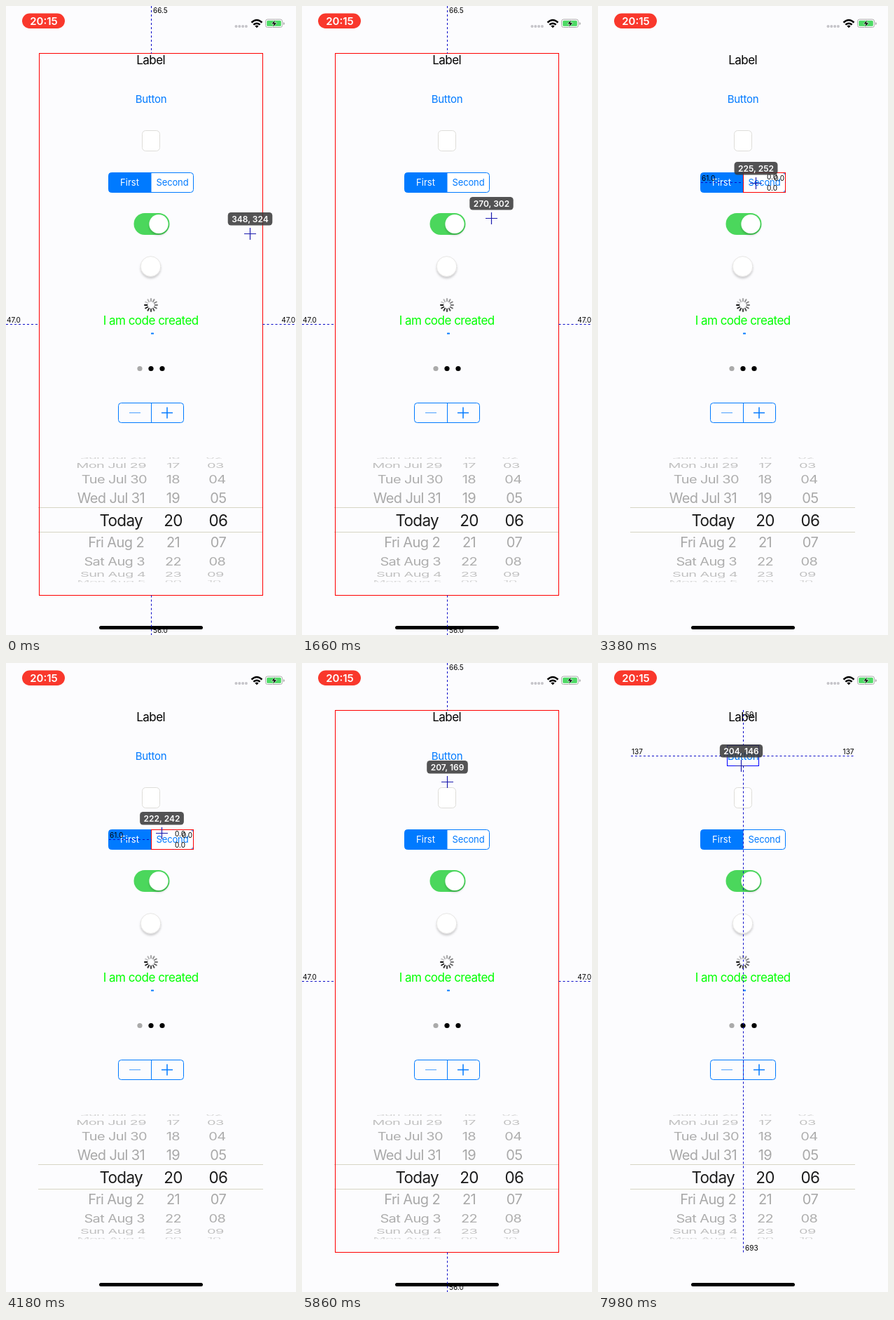
These frames come from a looping animation (414x896 px, 8000 ms). An HTML page:

```html
<!DOCTYPE html>
<html lang="en">
<head>
<meta charset="utf-8">
<title>Layout inspector</title>
<style>
html, body { margin: 0; width: 100%; height: 100%; overflow: hidden; background: #fcfcfe; }
svg { display: block; width: 414px; height: 896px; font-family: Inter, "Open Sans", sans-serif; }
text { letter-spacing: -.03em; }
.mid { text-anchor: middle; }
.end { text-anchor: end; }
.size { font-size: 10px; letter-spacing: 0; }
.blue { fill: #007aff; }
.line { fill: none; stroke: #007aff; }
.guide { stroke: #0a0ac8; stroke-dasharray: 3 3; fill: none; }
</style>
</head>
<body>
<svg viewBox="0 0 414 896">
  <defs>
    <filter id="shadow" x="-40%" y="-40%" width="180%" height="190%">
      <feDropShadow dx="0" dy="2.5" stdDeviation="1.6" flood-opacity=".2"/>
    </filter>
    <clipPath id="wheel"><rect x="46" y="643" width="321" height="177.5"/></clipPath>
  </defs>

  <g id="status">
    <rect x="23" y="10.5" width="61" height="21.5" rx="10.75" fill="#f9382c"/>
    <text x="54" y="26.5" class="mid" font-size="15" font-weight="600" fill="#fff" style="letter-spacing:0">20:15</text>
    <g fill="#c5c4c9">
      <circle cx="328.5" cy="29" r="2"/><circle cx="333.3" cy="29" r="2"/>
      <circle cx="338.1" cy="29" r="2"/><circle cx="342.9" cy="29" r="2"/>
    </g>
    <g fill="none" stroke="#000" stroke-width="2.4">
      <path d="M350.5 23.5Q358 16.5 365.5 23.5"/>
      <path d="M353.3 26.7Q358 22.6 362.7 26.7"/>
    </g>
    <path d="M355.4 28.6Q358 26.6 360.6 28.6L358 31.2Z"/>
    <rect x="370.5" y="19" width="24" height="11.5" rx="3" fill="#fff" stroke="#aaa"/>
    <rect x="372.2" y="20.7" width="20.6" height="8.1" rx="1.6" fill="#4cd964"/>
    <path d="M396 23v4q1.6-.5 1.6-2t-1.6-2Z" fill="#999"/>
    <path d="M384.5 19.5L378.8 25.7H382.2L380.7 30.5L386.8 24H383.3Z" stroke="#fff" stroke-width=".6"/>
  </g>

  <text x="206.7" y="82.5" class="mid" font-size="17">Label</text>
  <text x="207" y="137.5" class="mid blue" font-size="15" style="letter-spacing:-.02em">Button</text>
  <rect x="194.5" y="177.5" width="25" height="29" rx="5" fill="#fff" stroke="#deddd9"/>

  <g font-size="13">
    <rect x="146.5" y="237.5" width="121" height="28" rx="4" fill="#fff"/>
    <path d="M207.5 237.5H150.5a4 4 0 0 0-4 4v20a4 4 0 0 0 4 4h57Z" class="blue"/>
    <rect x="146.5" y="237.5" width="121" height="28" rx="4" class="line"/>
    <text x="176.5" y="256" class="mid" fill="#fff" style="letter-spacing:0">First</text>
    <text x="237.5" y="256" class="mid blue" style="letter-spacing:-.01em">Second</text>
  </g>

  <rect x="182.5" y="295" width="51" height="31" rx="15.5" fill="#4bd75c"/>
  <circle cx="218" cy="310.5" r="13.6" fill="#fff" filter="url(#shadow)"/>
  <circle cx="206.5" cy="371" r="14.3" fill="#fff" stroke="#dddcd8" stroke-width=".7" filter="url(#shadow)"/>

  <g id="spinner" stroke="#111" stroke-width="2" stroke-linecap="round"></g>
  <text x="206.7" y="454" class="mid" font-size="17" fill="#0f0">I am code created</text>
  <rect x="207" y="465.5" width="4" height="2" rx=".6" class="blue"/>

  <circle cx="191" cy="516.5" r="3.6" fill="#aaa"/>
  <circle cx="207" cy="516.5" r="3.6"/>
  <circle cx="223" cy="516.5" r="3.6"/>

  <rect x="160.5" y="565.5" width="93" height="28" rx="4" class="line"/>
  <path d="M207.5 565.5V593.5" class="line"/>
  <path d="M176 579.5H192" class="line" opacity=".7"/>
  <path d="M222 579.5H238M230 571.5V587.5" class="line" stroke-width="1.5"/>

  <g id="picker" clip-path="url(#wheel)"></g>
  <path d="M46 714.5H367M46 749.5H367" stroke="#d6d5c4"/>
  <rect x="133" y="883" width="148" height="5" rx="2.5"/>

  <g id="overlay"></g>
  <g id="cursor">
    <rect id="badge" y="-30" height="18.5" rx="4.5" fill="#383838" fill-opacity=".86"/>
    <text id="coords" x=".5" y="-16.3" class="mid" font-size="12" font-weight="600" fill="#fff" style="letter-spacing:0"></text>
    <path d="M-8 .5H9M.5 -8V9" stroke="#1c1cae" stroke-width="1.2"/>
  </g>
</svg>

<script>
const $ = id => document.getElementById(id);
const LOOP = 8000;

$('spinner').innerHTML = Array.from({length: 12}, (_, i) =>
  `<path d="M207 420.5V417" opacity="${1 - .07 * i}" transform="rotate(${270 - 30 * i} 207 426)"/>`).join('');

// Wheel rows: centre y, vertical squash, grey, date, date right edge, hour, minute, minute centre
const rows = [
  [643.5, .22, '#d2d2d2', 'Sun Jul 28', 200, '16', '02', 297],
  [654.5, .48, '#c0c0c0', 'Mon Jul 29', 200, '17', '03', 299],
  [674, .77, '#adadad', 'Tue Jul 30', 201, '18', '04', 301.5],
  [701, .97, '#a8a8a8', 'Wed Jul 31', 198, '19', '05', 303],
  [733, 1, '#1c1c1c', 'Today', 195, '20', '06', 303],
  [764, .97, '#a8a8a8', 'Fri Aug 2', 197, '21', '07', 303],
  [791, .77, '#adadad', 'Sat Aug 3', 198, '22', '08', 301.5],
  [810, .48, '#c0c0c0', 'Sun Aug 4', 199, '23', '09', 299],
  [820.5, .22, '#d2d2d2', 'Mon Aug 5', 199, '00', '10', 297]
];
$('picker').innerHTML = rows.map(([y, squash, grey, date, right, hour, minute, mx]) => {
  const size = date === 'Today' ? 22.5 : 20;
  return `<g transform="translate(0 ${y}) scale(1 ${squash})" fill="${grey}" font-size="${size}">
    <g transform="translate(0 ${size * .364})"><text x="${right}" class="end">${date}</text>
    <text x="238.5" class="mid">${hour}</text><text x="${mx}" class="mid">${minute}</text></g></g>`;
}).join('');

// Inspectable views, innermost first. Boxes are [left, top, right, bottom]; sizes are left, top, right, bottom.
const screen = [0, 0, 414, 896], stack = [47, 67, 366.5, 839.5];
const button = [184.5, 117.5, 229.5, 146.5], field = [194.5, 177.5, 219.5, 206.5];
const views = [
  {box: [184.5, 124.5, 229.5, 140.5], parent: button, sizes: ['0', '6', '0', '6'], color: '#00f'},
  {box: button, parent: stack, sizes: ['137', '50', '137', '693'], color: '#00f'},
  {box: [201.5, 180.5, 212.5, 204.5], parent: field, sizes: ['7.0', '2.0', '7.0', '2.0'], color: '#f00'},
  {box: field, parent: stack, sizes: ['147', '110', '147', '633'], color: '#f00'},
  {box: [207.5, 237.5, 267.5, 265.5], parent: [147, 237, 267, 266], sizes: ['61.0', '0.0', '0.0', '0.0'], color: '#f00'},
  {box: [47.5, 67.5, 366.5, 839.5], parent: screen, sizes: ['47.0', '66.5', '47.0', '56.0'], color: '#f00'}
];

function overlayMarkup({box: [l, t, r, b], parent: [pl, pt, pr, pb], sizes, color}) {
  const cx = Math.round((l + r) / 2) + .5, cy = Math.floor((t + b) / 2) + .5;
  const label = (x, y, value, side = '') => `<text x="${x}" y="${y}" class="size ${side}">${value}</text>`;
  return `<rect x="${l}" y="${t}" width="${r - l}" height="${b - t}" fill="none" stroke="${color}"/>
    <path class="guide" d="M${pl} ${cy}H${l}M${r} ${cy}H${pr}M${cx} ${pt}V${t}M${cx} ${b}V${pb}"/>` +
    label(pl + 1, cy - 2.5, sizes[0]) + label(cx + 2.5, pt + 9.5, sizes[1]) +
    label(pr - 1, cy - 2.5, sizes[2], 'end') + label(cx + 2.5, pb - 3, sizes[3]);
}

// Cursor path: time, x, y
const path = [
  [0, 348, 324], [1660, 270, 302], [2680, 228, 261], [4180, 222, 242],
  [5160, 210, 194], [6700, 204, 140], [7980, 204, 146], [LOOP, 204, 146]
];
function cursorAt(time) {
  const i = path.findIndex(p => p[0] > time);
  const [t0, x0, y0] = path[i - 1], [t1, x1, y1] = path[i];
  const k = (time - t0) / (t1 - t0);
  return [Math.round(x0 + (x1 - x0) * k), Math.round(y0 + (y1 - y0) * k)];
}

const contains = ([l, t, r, b], x, y) => x >= l && x <= r && y >= t && y <= b;
let shown;

function draw() {
  const [x, y] = cursorAt(performance.now() % LOOP);
  $('cursor').setAttribute('transform', `translate(${x} ${y})`);
  $('coords').textContent = `${x}, ${y}`;
  const width = $('coords').getComputedTextLength() + 11;
  $('badge').setAttribute('x', .5 - width / 2);
  $('badge').setAttribute('width', width);
  const view = views.find(v => contains(v.box, x, y));
  if (view !== shown) {
    $('overlay').innerHTML = overlayMarkup(view);
    shown = view;
  }
  requestAnimationFrame(draw);
}
draw();
</script>
</body>
</html>
```
